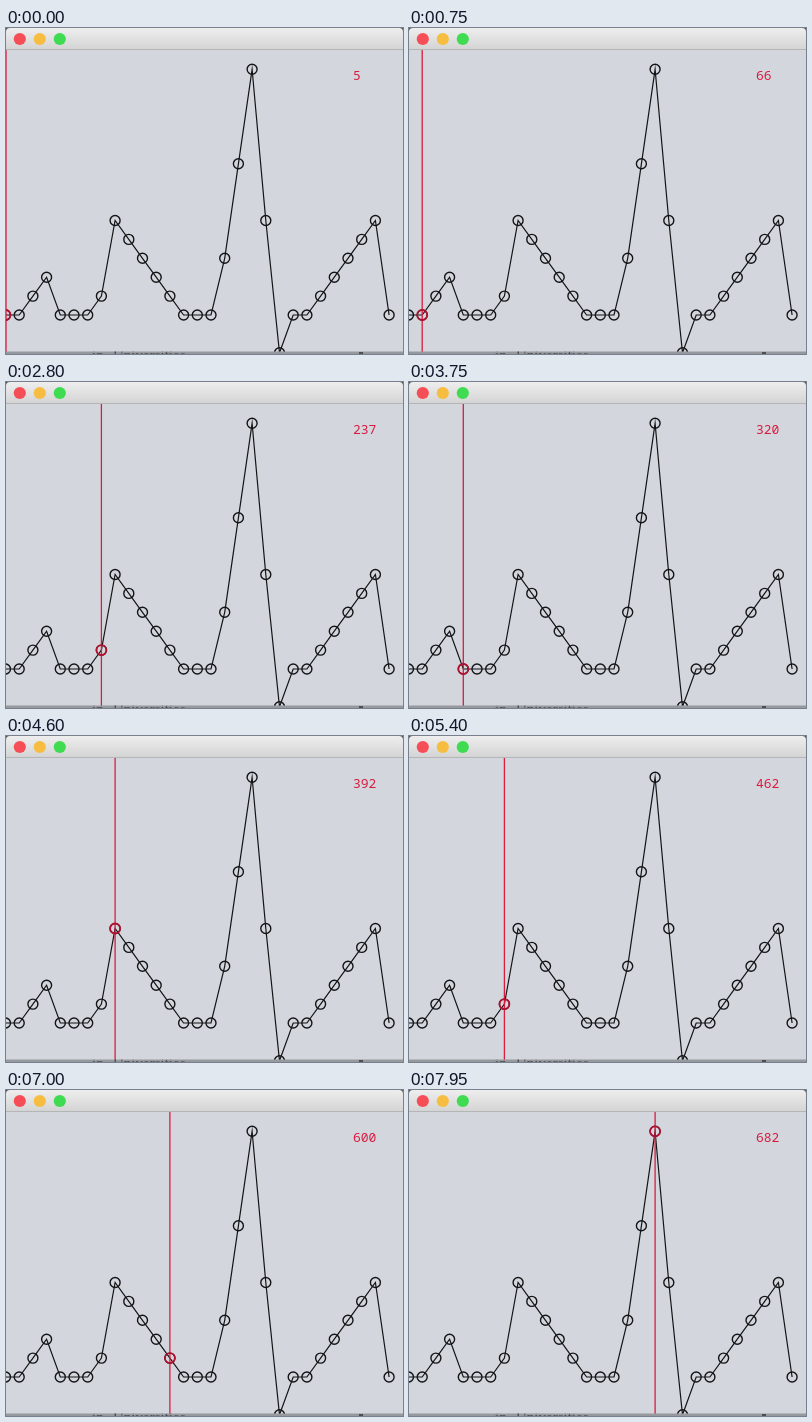
Animation of 397 by 326 pixels, one loop 8 s. Source, as an HTML page with a canvas:

```html
<!DOCTYPE html>
<html lang="en">
<head>
<meta charset="utf-8">
<title>Search on a line graph</title>
<style>
html, body { margin: 0; width: 100%; height: 100%; overflow: hidden; background: #d3d7dd; }
canvas { display: block; }
</style>
</head>
<body>
<canvas id="stage" width="397" height="326"></canvas>
<script>
const ctx = document.getElementById('stage').getContext('2d');
const W = 397, H = 326, TOP = 22, BOTTOM = 324;
const LOOP = 8000, STEP = 50;
const RED = '#d81c40', INK = '#131416';

// Corners of the curve as [node, height]; nodes between them lie on straight slopes.
const corners = [
  [0, 0], [1, 0], [3, 2], [4, 0], [6, 0], [7, 1], [8, 5], [13, 0], [15, 0],
  [16, 3], [18, 13], [19, 5], [20, -2], [21, 0], [22, 0], [27, 5], [28, 0]
];

// Stages of the search as [time in ms, counter, node]
const stages = [
  [0, 5, 0], [1450, 122, 2], [2800, 237, 7], [3750, 320, 4],
  [4600, 392, 8], [6150, 527, 8], [7950, 682, 18]
];

// Finds the span of keys around x and how far x lies along it.
function span(keys, x) {
  const next = keys.findIndex(key => key[0] > x);
  const k = next < 0 ? keys.length - 1 : next;
  const from = keys[k - 1], to = keys[k];
  return { from, to, p: (x - from[0]) / (to[0] - from[0]) };
}

function between({ from, to, p }, column) {
  return from[column] + (to[column] - from[column]) * p;
}

const nodes = Array.from({ length: 29 }, (_, i) => ({
  x: 13.7 * i - 0.5,
  y: 287 - 18.9 * between(span(corners, i), 1)
}));

// The walker drifts to the next stage and wavers on the way.
function nodeAt(t, stage) {
  const waver = 0.8 * Math.sin(t / 130) * Math.sin(Math.PI * stage.p);
  const i = Math.round(between(stage, 2) + waver);
  return nodes[Math.max(0, Math.min(i, nodes.length - 1))];
}

function disc(x, y, r, fill) {
  ctx.fillStyle = fill;
  ctx.beginPath();
  ctx.arc(x, y, r, 0, 2 * Math.PI);
  ctx.fill();
}

function ring({ x, y }, color, width) {
  ctx.strokeStyle = color;
  ctx.lineWidth = width;
  ctx.beginPath();
  ctx.arc(x, y, 5, 0, 2 * Math.PI);
  ctx.stroke();
}

function drawTitleBar() {
  const shade = ctx.createLinearGradient(0, 0, 0, TOP);
  shade.addColorStop(0, '#eeeeee');
  shade.addColorStop(1, '#d3d3d3');
  ctx.fillStyle = '#55585c';
  ctx.fillRect(0, 0, W, 5);
  ctx.fillStyle = shade;
  ctx.beginPath();
  ctx.roundRect(0, 0, W, TOP, [4, 4, 0, 0]);
  ctx.fill();
  ctx.fillStyle = '#b4b5b7';
  ctx.fillRect(0, TOP - 1, W, 1);
  ['#f64e57', '#f6bd41', '#3fdb50'].forEach((c, i) => disc(13.8 + 20 * i, 11, 6.1, c));
}

function drawGraph() {
  ctx.strokeStyle = INK;
  ctx.lineWidth = 1.2;
  ctx.beginPath();
  nodes.forEach(p => ctx.lineTo(p.x, p.y));
  ctx.stroke();
  nodes.forEach(p => ring(p, INK, 1.4));
}

function drawMarker(p) {
  const x = Math.max(p.x, 0);
  ctx.strokeStyle = RED;
  ctx.lineWidth = 1.3;
  ctx.beginPath();
  ctx.moveTo(x, TOP);
  ctx.lineTo(x, BOTTOM);
  ctx.stroke();
  ring(p, '#b5102f', 1.8);
}

function drawCounter(value) {
  ctx.fillStyle = RED;
  ctx.font = '13px "Noto Sans Mono", monospace';
  ctx.fillText(value, 347, 52);
}

// Sliver of the page behind the window
function drawBackdrop() {
  ctx.save();
  ctx.beginPath();
  ctx.rect(0, BOTTOM - 0.5, W, H);
  ctx.clip();
  ctx.fillStyle = '#96999e';
  ctx.fillRect(0, 0, W, H);
  ctx.fillStyle = '#4c4e52';
  ctx.font = '15px "Liberation Serif", serif';
  ctx.fillText('in', 86, 332);
  ctx.fillText('Universities', 107, 332);
  ctx.fillRect(353, BOTTOM, 4, 2);
  ctx.restore();
}

function draw(t) {
  const stage = span(stages, t);
  ctx.fillStyle = '#d3d7dd';
  ctx.fillRect(0, 0, W, H);
  drawTitleBar();
  drawGraph();
  drawMarker(nodeAt(t, stage));
  drawCounter(Math.round(between(stage, 1)));
  drawBackdrop();
}

const start = performance.now();
function tick() {
  const t = (performance.now() - start) % LOOP;
  draw(Math.floor(t / STEP) * STEP);
  requestAnimationFrame(tick);
}
tick();
</script>
</body>
</html>
```
